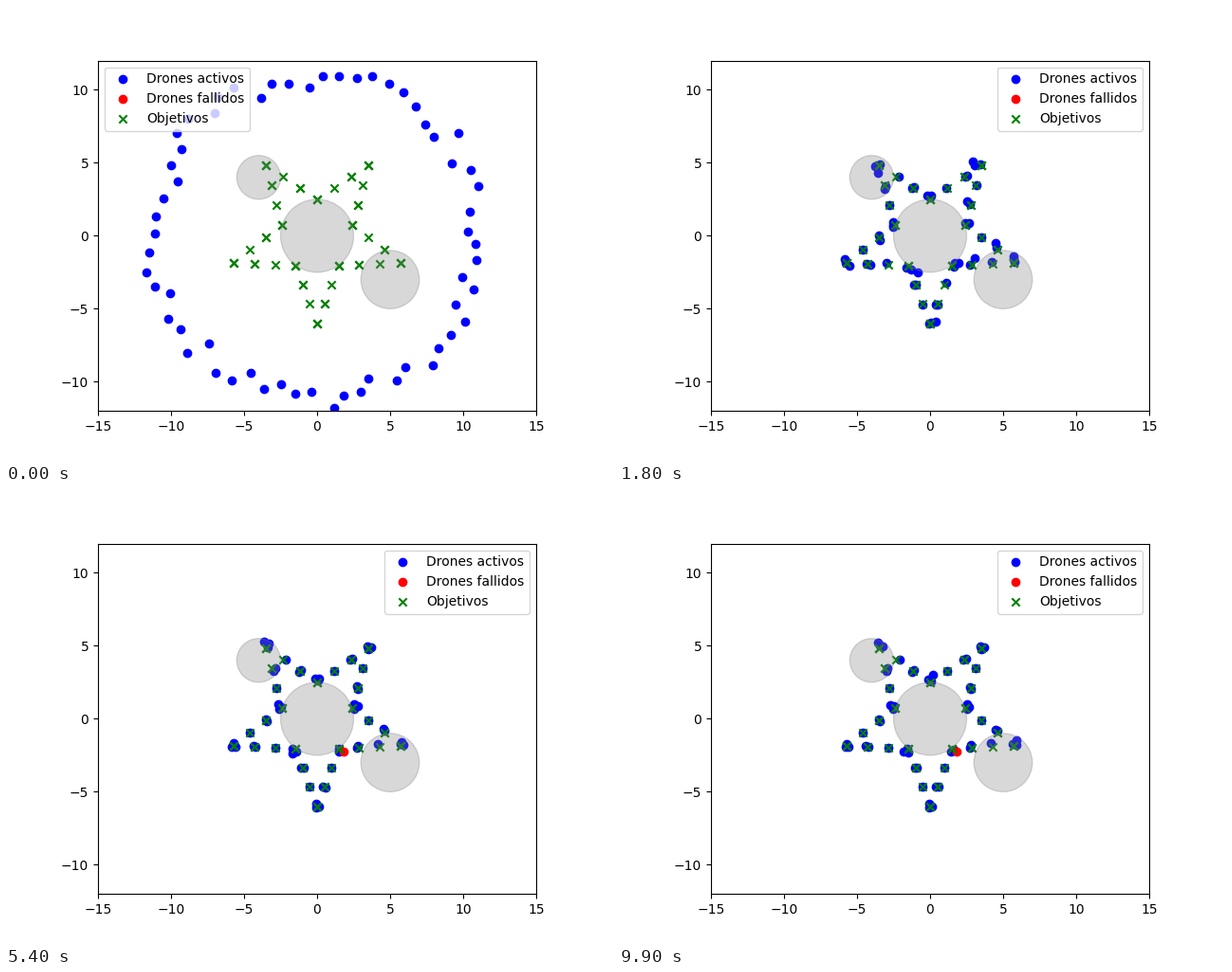
These frames come from a looping animation (640 px wide and 480 px high, 10000 ms). A matplotlib script:

```python
import numpy as np
import matplotlib.pyplot as plt
from matplotlib.animation import FuncAnimation

N, FRAMES, INTERVAL = 60, 100, 100
FAILED, FAIL_STEP = 5, 50
OBSTACLES = [((0, 0), 2.5), ((5, -3), 2.0), ((-4, 4), 1.5)]

INERTIA, MAX_PULL = 0.55, 0.15
AVOID, AVOID_MARGIN = 0.0165, 0.5
SPREAD, SPREAD_RANGE = 0.0064, 0.5


def polar(r, deg):
    a = np.radians(deg)
    return np.stack([r * np.cos(a), r * np.sin(a)], axis=-1)


def star_targets():
    """Six targets per edge, on its thirds, some of them shared."""
    k = np.arange(11)
    corners = polar(np.where(k % 2, 2.5, 6.0), -90 + 36 * k)
    thirds = np.array([0, 0, 1, 1, 2, 3]) / 3
    return np.concatenate([a + thirds[:, None] * (b - a)
                           for a, b in zip(corners, corners[1:])])


def push(offset, reach):
    """Unit vectors along offset, zero beyond reach."""
    d = np.linalg.norm(offset, axis=-1, keepdims=True)
    return np.where(d < reach, offset / np.maximum(d, 1e-9), 0)


def simulate(targets):
    """Drones leave a ring and are pulled to their targets at random rates."""
    rng = np.random.default_rng(7)
    pos = polar(12, 360 / N * np.arange(N))
    vel = np.zeros_like(pos)
    path = np.empty((FRAMES, N, 2))
    for step in range(FRAMES):
        pull = rng.uniform(0, MAX_PULL, (N, 1))
        vel = INERTIA * vel + pull * (targets - pos)
        for center, r in OBSTACLES:
            vel += AVOID * push(pos - center, r + AVOID_MARGIN)
        gaps = pos[:, None] - pos
        vel += SPREAD * push(gaps, SPREAD_RANGE).sum(axis=1)
        if step >= FAIL_STEP:
            vel[FAILED] = 0
        pos = pos + vel
        path[step] = pos
    return path


targets = star_targets()
path = simulate(targets)

fig, ax = plt.subplots(figsize=(6.4, 4.8), dpi=100)
ax.set_xlim(-15, 15)
ax.set_ylim(-12, 12)
ax.set_aspect("equal")
active = ax.scatter(*path[0].T, color="blue", label="Drones activos")
failed = ax.scatter([], [], color="red", label="Drones fallidos")
ax.scatter(*targets.T, color="green", marker="x", label="Objetivos")
for center, r in OBSTACLES:
    ax.add_patch(plt.Circle(center, r, color="gray", alpha=0.3))
legend = ax.legend(loc="upper left")


def update(step):
    down = (np.arange(N) == FAILED) & (step >= FAIL_STEP)
    active.set_offsets(path[step, ~down])
    failed.set_offsets(path[step, down])
    legend.set_loc("upper right" if step else "upper left")
    return active, failed, legend


anim = FuncAnimation(fig, update, frames=FRAMES, interval=INTERVAL,
                     repeat=True, repeat_delay=0)
plt.show()
```
